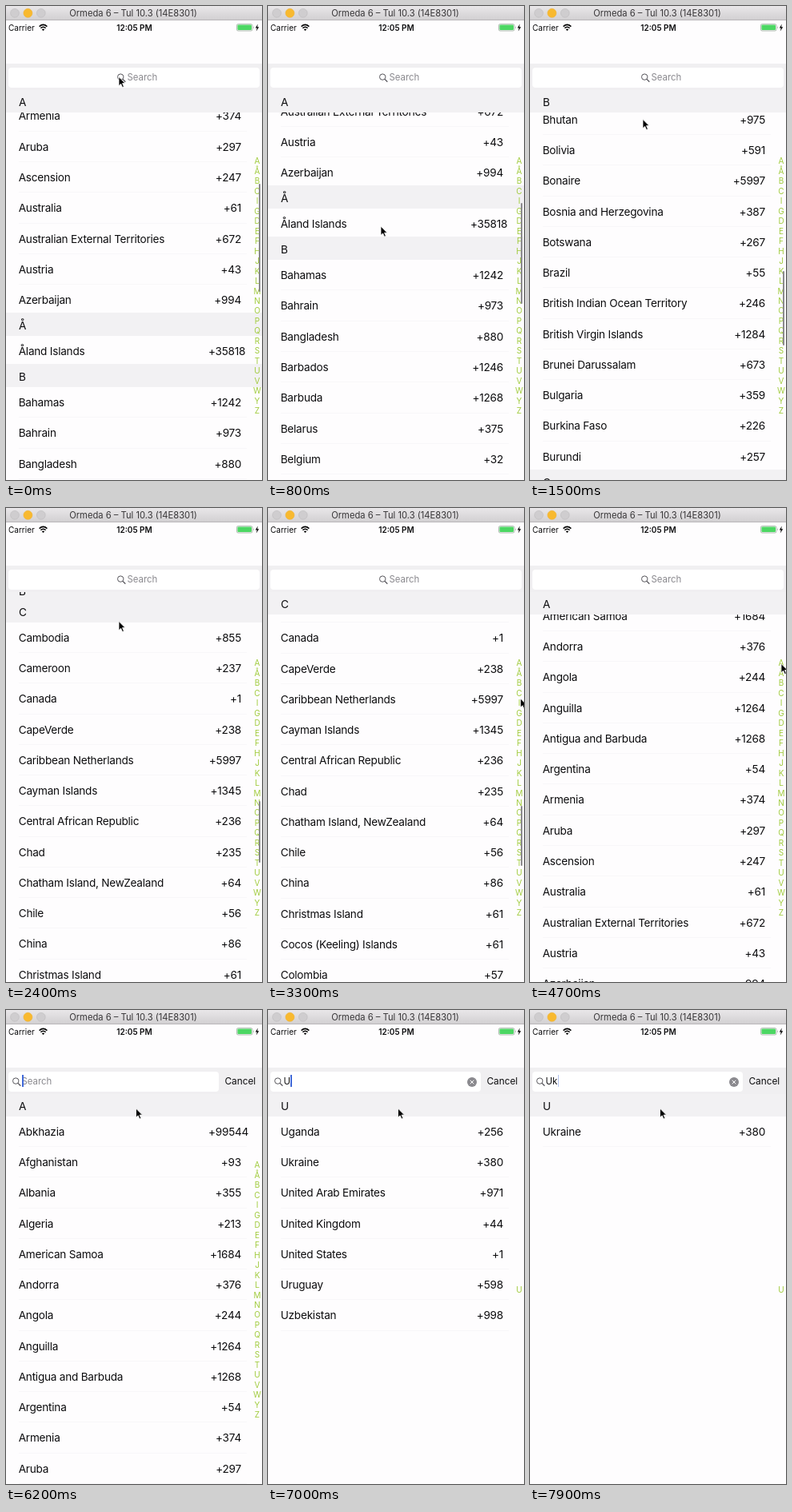
An HTML page that plays this animation: 320x592 px, repeating every 8 s.

```html
<!DOCTYPE html>
<html lang="en">
<head>
<meta charset="utf-8">
<title>Country code picker</title>
<style>
html, body { margin: 0; width: 100%; height: 100%; overflow: hidden; }
body { background: #fefdfe; color: #0c0c0e; font: 13.6px Inter, Roboto, sans-serif; }
#stage { position: relative; width: 320px; height: 592px; overflow: hidden; white-space: nowrap; }
#stage > *, .field > * { position: absolute; }
.title { left: 0; top: 0; width: 320px; height: 18px; padding-right: 2px; box-sizing: border-box;
  background: linear-gradient(#e9e7e9, #d2d0d2); border-bottom: 1px solid #b9b7b9;
  text-align: center; font-size: 11.2px; line-height: 18px; color: #383638; }
.status { top: 20px; line-height: 14px; font-size: 10px; }
.bar { left: 0; top: 72px; width: 320px; height: 33px; background: #f0eff1; }
.field { left: 3px; top: 77px; height: 25px; background: #fff; border-radius: 4px; font-size: 11.4px; line-height: 25px; }
.hint { color: #8a898e; }
.entry { left: 16.5px; top: 0; }
#caret { display: inline-block; width: 1.5px; height: 15px; margin-left: .5px; background: #4169d8; vertical-align: -3px; }
#cancel { top: 77px; line-height: 25px; font-size: 11.8px; }
#list { left: 0; top: 104px; width: 320px; height: 488px; overflow: hidden; isolation: isolate; letter-spacing: -.017em; }
#list::before { content: ""; display: block; height: 3px; }
#list::after { content: ""; display: block; height: 500px; }
h2 { position: sticky; top: 3px; z-index: 1; margin: 0; padding-left: 16px; height: 25.8px;
  font: inherit; line-height: 26px; background: #f2f1f3; box-shadow: 0 -3px #f2f1f3; }
.row { position: relative; height: 38.27px; line-height: 38.27px; padding-left: 15.7px; }
.row::after { content: ""; position: absolute; left: 16px; right: 19px; bottom: 0; height: 1px; background: #f8f7f9; }
.row b { position: absolute; left: 253px; width: 41px; text-align: right; font-weight: 400; }
#index { right: 0; top: 107px; width: 12px; height: 485px; display: flex; flex-direction: column; justify-content: center;
  text-align: center; font-size: 10px; line-height: 12.48px; color: #a0cb3c; }
#thumb { left: 316px; width: 2px; border-radius: 1px; background: #8b8a8d; }
svg { overflow: visible; }
</style>
</head>
<body>
<div id="stage">
  <div id="list"></div>
  <div id="index"></div>
  <div id="thumb"></div>
  <div class="title">Ormeda 6 – Tul 10.3 (14E8301)</div>
  <div class="status" style="left:3px">Carrier</div>
  <div class="status" style="left:0;width:321px;text-align:center;font-weight:600">12:05 PM</div>
  <div class="bar"></div>
  <div class="field" id="field">
    <svg id="lens" width="11" height="11" style="top:7px" fill="none" stroke="#55545a"><circle cx="4.2" cy="4.6" r="3.7"/><path d="M7 7.4 10.3 10.7" stroke-width="1.3"/></svg>
    <span class="hint" id="hint">Search</span>
    <span class="entry"><span id="typed"></span><i id="caret"></i></span>
    <svg id="clear" width="12" height="12" style="left:245.5px;top:6.5px"><circle cx="6" cy="6" r="6" fill="#8a898e"/><path d="M3.7 3.7 8.3 8.3M8.3 3.7 3.7 8.3" stroke="#fff"/></svg>
  </div>
  <div id="cancel">Cancel</div>
  <svg width="320" height="592" style="left:0;top:0">
    <g stroke="#bdbbbd" stroke-width=".6"><circle cx="11" cy="8.8" r="5.4" fill="#cfcdcf"/><circle cx="27.4" cy="8.8" r="5.5" fill="#f8b92f" stroke="#eeb033"/><circle cx="43.8" cy="8.8" r="5.4" fill="#cfcdcf"/></g>
    <path d="M41.6 25.6Q46.5 21.2 51.4 25.6M43.4 27.6Q46.5 25 49.6 27.6" fill="none" stroke="#000" stroke-width="1.5"/>
    <path d="M44.8 29.2Q46.5 28 48.2 29.2L46.5 31Z"/>
    <rect x="288.4" y="22.6" width="19.6" height="8.4" rx="1.8" fill="none" stroke="#8c9c8e" stroke-width=".7"/>
    <rect x="289.4" y="23.6" width="17.6" height="6.4" rx="1" fill="#4cd763"/>
    <path d="M309 25.2q1.4 1.6 0 3.2z" fill="#8c9c8e"/>
    <path d="M314.8 22.5 311.8 27.4H313.8L312.8 31.5 316.2 26.2H314.1Z"/>
    <path id="pointer" d="M0 0V11.2L2.6 8.8 4.5 13 6.4 12.2 4.5 8.1H8Z" stroke="#fff" stroke-width=".8"/>
  </svg>
</div>
<script>
const $ = id => document.getElementById(id);
const LOOP = 8000, STEP = 100;
const sections = {
  A: "Abkhazia 99544|Afghanistan 93|Albania 355|Algeria 213|American Samoa 1684|Andorra 376|Angola 244|Anguilla 1264|Antigua and Barbuda 1268|Argentina 54|Armenia 374|Aruba 297|Ascension 247|Australia 61|Australian External Territories 672|Austria 43|Azerbaijan 994",
  Å: "Åland Islands 35818",
  B: "Bahamas 1242|Bahrain 973|Bangladesh 880|Barbados 1246|Barbuda 1268|Belarus 375|Belgium 32|Belize 501|Benin 229|Bermuda 1441|Bhutan 975|Bolivia 591|Bonaire 5997|Bosnia and Herzegovina 387|Botswana 267|Brazil 55|British Indian Ocean Territory 246|British Virgin Islands 1284|Brunei Darussalam 673|Bulgaria 359|Burkina Faso 226|Burundi 257",
  C: "Cambodia 855|Cameroon 237|Canada 1|CapeVerde 238|Caribbean Netherlands 5997|Cayman Islands 1345|Central African Republic 236|Chad 235|Chatham Island, NewZealand 64|Chile 56|China 86|Christmas Island 61|Cocos (Keeling) Islands 61|Colombia 57|Comoros 269|Congo 242",
  U: "Uganda 256|Ukraine 380|United Arab Emirates 971|United Kingdom 44|United States 1|Uruguay 598|Uzbekistan 998"
};
const row = item => {
  const cut = item.lastIndexOf(" "), name = item.slice(0, cut);
  return `<div class="row" data-name="${name}">${name}<b>+${item.slice(cut + 1)}</b></div>`;
};
$("list").innerHTML = Object.entries(sections).map(([key, items]) =>
  `<section><h2>${key}</h2>${items.split("|").map(row).join("")}</section>`).join("");
$("index").innerHTML = [..."AÅBCIGDEFHJKLMNOPQRSTUVWYZ"].map(c => `<span>${c}</span>`).join("");

const clamp = v => Math.min(1, Math.max(0, v));
const mix = (a, b, p) => a + (b - a) * p;
const smooth = p => (1 - Math.cos(Math.PI * p)) / 2;

// Keys are [position, ...values]; returns the values at x.
function tween(keys, x, ease = smooth) {
  let i = 0;
  while (i < keys.length - 2 && x >= keys[i + 1][0]) i++;
  const [a, b] = [keys[i], keys[i + 1]];
  const p = ease(clamp((x - a[0]) / (b[0] - a[0])));
  return a.slice(1).map((v, k) => mix(v, b[k + 1], p));
}

const pointerPath = [[0, 141, 88.5], [300, 141, 88.5], [950, 141, 302], [1100, 141, 302], [1230, 141, 141.5],
  [2500, 141, 141.5], [3200, 315.5, 238], [3900, 315.5, 236], [4100, 315, 230], [4500, 314, 194.5],
  [4800, 314, 194.5], [5300, 168, 92], [5450, 168, 92], [5800, 162.5, 123]];
const indexJumps = [[4000, 1690], [4100, 1608], [4200, 1608], [4350, 680], [4500, 680], [4800, 0]];
const thumbSizes = [[397, 222, 135], [1133, 331, 93], [1598, 366, 77], [1675, 372, 75], [1690, 373, 75]];

// Flick, drag, second flick with friction, then jumps from the letter index.
function scrollAt(t) {
  const coast = s => Math.exp(-s / 500);
  if (t < 1100) return 597 - 200 * coast(t);
  if (t < 1230) return mix(575, 735, (t - 1100) / 130);
  if (t < 4000) return 1690 - 955 * coast(t - 1230);
  return tween(indexJumps, t)[0];
}

let shown = null;
function filter(query) {
  if (query === shown) return;
  shown = query;
  for (const s of document.querySelectorAll("section")) {
    let any = false;
    for (const r of s.querySelectorAll(".row")) {
      const hit = r.dataset.name.startsWith(query);
      r.style.display = hit ? "" : "none";
      any = any || hit;
    }
    s.style.display = any ? "" : "none";
  }
  for (const s of $("index").children) s.style.display = !query || s.textContent === "U" ? "" : "none";
  $("typed").textContent = query;
  $("hint").style.display = query ? "none" : "";
  $("clear").style.display = query ? "" : "none";
}

function draw(t) {
  filter(t < 6900 ? "" : t < 7500 ? "U" : "Uk");
  const y = scrollAt(t);
  $("list").scrollTop = y;

  const [top, size] = tween(thumbSizes, y, p => p);
  $("thumb").style.cssText = `top:${top}px;height:${size}px;opacity:${clamp((3800 - t) / 250)}`;

  const p = smooth(clamp((t - 5420) / 360));
  $("field").style.width = mix(314, 263, p) + "px";
  $("lens").style.left = mix(136, 5, p) + "px";
  $("hint").style.left = mix(148.5, 16.5, p) + "px";
  $("cancel").style.left = mix(322, 273.5, p) + "px";

  const since = t < 6900 ? 5900 : t < 7500 ? 6900 : 7500;
  const age = Math.max(0, t - since) % 1000;
  $("caret").style.opacity = t < 5700 ? 0 : age > 850 ? 1 : clamp((440 - age) / 100);

  $("pointer").setAttribute("transform", `translate(${tween(pointerPath, t)})`);
}

const start = performance.now();
function tick() {
  const t = (performance.now() - start) % LOOP;
  draw(Math.floor(t / STEP) * STEP);
  requestAnimationFrame(tick);
}
tick();
</script>
</body>
</html>
```
